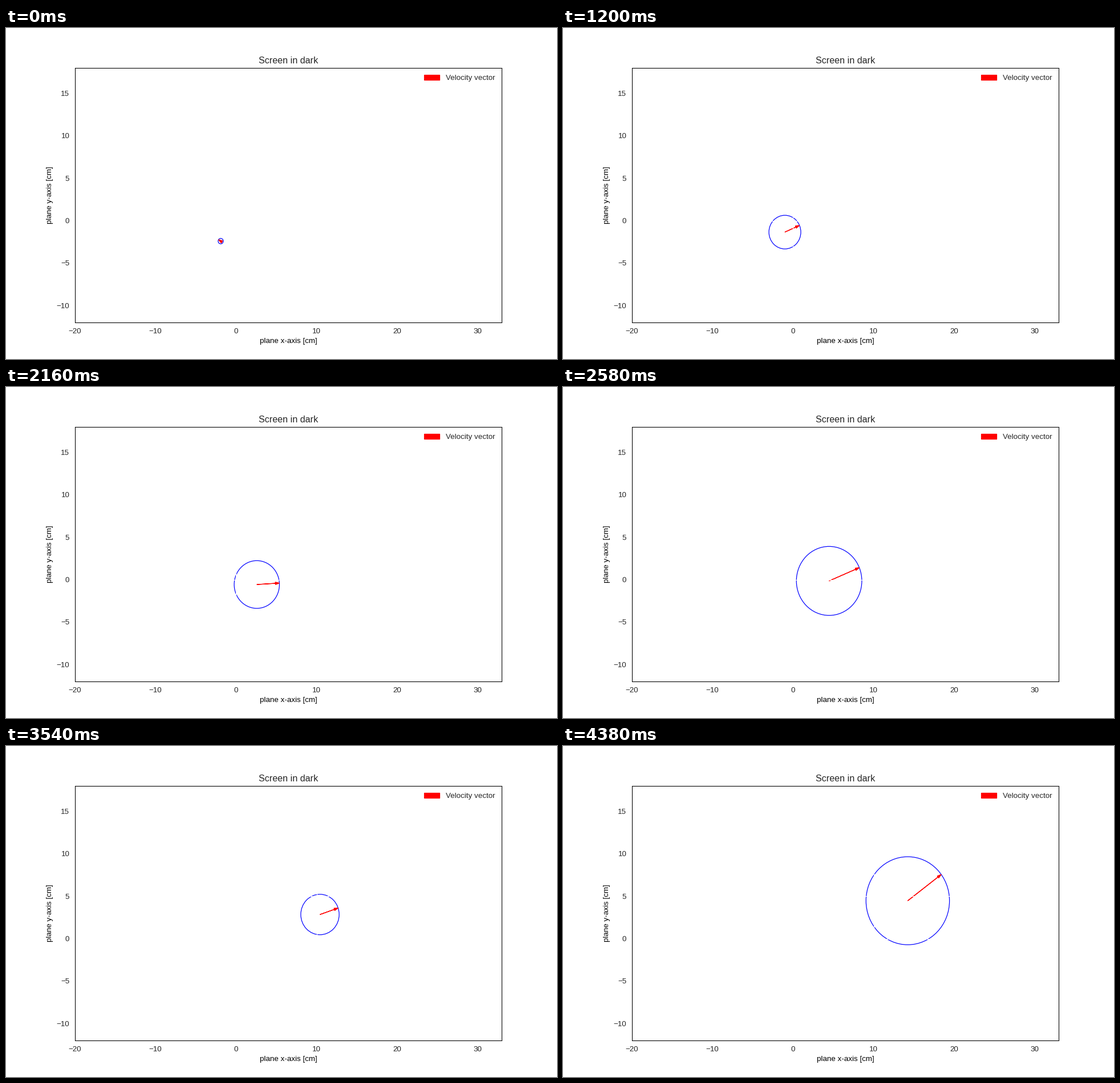
A matplotlib script that plays this animation: 966x580 px, repeating every 6.16 s.

```python
import matplotlib.pyplot as plt
import numpy as np
from matplotlib.animation import FuncAnimation
from matplotlib.patches import Circle

TICK, LOOP, STEP = 20, 6160, 60  # milliseconds
LAST = 73
INK = "0.15"

plt.rcParams.update({
    "font.family": "Liberation Sans", "font.size": 10,
    "text.color": INK, "xtick.color": INK, "ytick.color": INK,
    "axes.labelcolor": "black", "axes.edgecolor": "black",
    "axes.linewidth": 0.8, "axes.titlesize": 12,
    "axes.grid": True, "axes.axisbelow": "line",
    "grid.color": "white", "grid.linewidth": 0.8,
    "xtick.major.size": 0, "ytick.major.size": 0,
    "xtick.major.pad": 7, "ytick.major.pad": 7,
    "legend.frameon": False,
})

# Waypoints of the moving centre: step, x, y
PATH = np.array([
    (0, -1.90, -2.41), (11, -1.87, -1.94), (20, -1.01, -1.35),
    (28, 0.76, -0.75), (43, 4.48, -0.15), (51, 7.29, 1.29),
    (59, 10.42, 2.84), (62, 10.95, 2.95), (69, 12.93, 3.61),
    (73, 14.24, 4.46),
])
# The speed rises and falls evenly between these turning points: step, speed
SPEED = np.array([
    (0, 0.32), (20, 1.98), (30, 3.29), (33, 2.27), (43, 4.06),
    (51, 5.12), (55, 4.5), (59, 2.38), (66, 2.4), (73, 5.18),
])
TIMES, POINTS = PATH[:, 0], PATH[:, 1:]
SLOPES = np.gradient(POINTS, TIMES, axis=0, edge_order=2)


def path(t):
    """Smooth curve through the waypoints (cubic Hermite)."""
    i = np.clip(np.searchsorted(TIMES, t) - 1, 0, len(TIMES) - 2)
    span = TIMES[i + 1] - TIMES[i]
    u = (t - TIMES[i]) / span
    blend = u * u * (3 - 2 * u)
    return (POINTS[i] * (1 - blend) + POINTS[i + 1] * blend
            + span * u * (1 - u) * (SLOPES[i] * (1 - u) - SLOPES[i + 1] * u))


def state(step):
    """Centre, speed and velocity; the velocity points along the path."""
    speed = np.interp(step, *SPEED.T)
    dx, dy = path(step + 0.01) - path(step - 0.01)
    heading = np.arctan2(dy, dx)
    velocity = speed * np.array([np.cos(heading), np.sin(heading)])
    return path(step), speed, velocity


fig, ax = plt.subplots(figsize=(10, 6.0042), dpi=96.6, facecolor="white")
fig.subplots_adjust(left=0.125, right=0.9, bottom=0.11, top=0.88)
ax.set(xlim=(-20, 33), ylim=(-12, 18), title="Screen in dark",
       xlabel="plane x-axis [cm]", ylabel="plane y-axis [cm]")

centre, speed, velocity = state(0)
ring = ax.add_patch(Circle(centre, speed, fill=False, edgecolor="blue",
                           linewidth=0.9))
arrow = ax.arrow(*centre, *velocity, width=0.001, head_width=0.3,
                 head_length=0.5, length_includes_head=True, color="red",
                 linewidth=0.9, label="Velocity vector")
ax.legend(handles=[arrow], loc="upper right")


def update(frame):
    (x, y), speed, (vx, vy) = state(min(frame * TICK // STEP, LAST))
    ring.set_center((x, y))
    ring.set_radius(speed)
    arrow.set_data(x=x, y=y, dx=vx, dy=vy)
    return ring, arrow


anim = FuncAnimation(fig, update, frames=LOOP // TICK, interval=TICK,
                     repeat=True, repeat_delay=0, blit=False)
plt.show()
```
